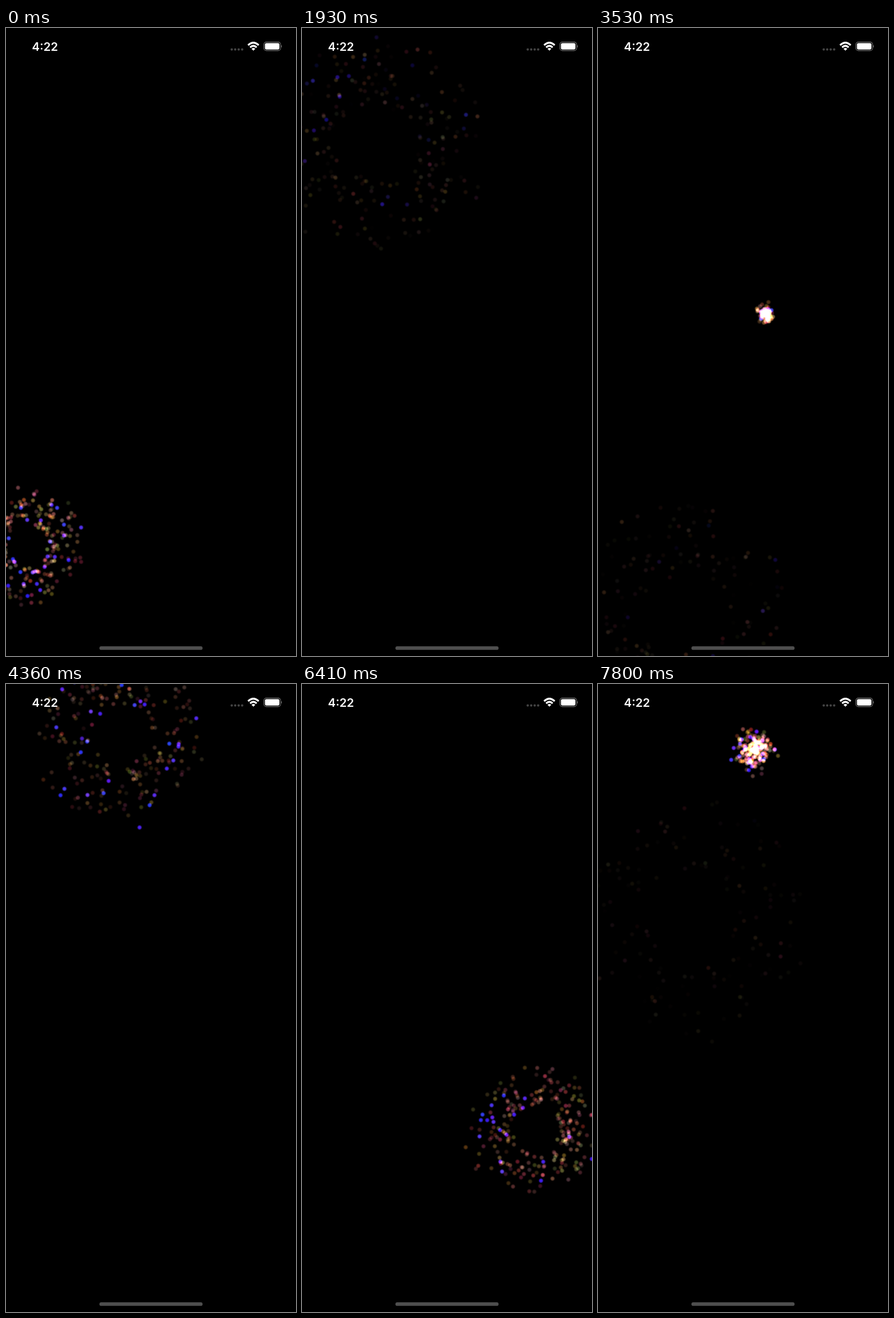
An HTML page with a canvas for the animation above (7.83 s loop, 509 by 1100 pixels).

```html
<!DOCTYPE html>
<html lang="en">
<head>
<meta charset="utf-8">
<title>Fireworks</title>
<style>
  html, body { margin: 0; width: 100%; height: 100%; overflow: hidden; background: #000; }
  canvas, svg { position: absolute; left: 0; top: 0; width: 509px; height: 1100px; }
</style>
</head>
<body>
<canvas id="sky" width="509" height="1100"></canvas>
<svg viewBox="0 0 509 1100" fill="#fff">
  <text x="45.5" y="39.8" font-size="20.5" font-weight="600" font-family="Inter, Roboto, sans-serif">4:22</text>
  <path d="M396.2 37.6h19" stroke="#444" stroke-width="4.2" stroke-linecap="round" stroke-dasharray="0 6.1"/>
  <g fill="none" stroke="#fff" stroke-width="3.2">
    <path d="M424.9 30.2Q434.2 21.4 443.5 30.2"/>
    <path d="M428.5 34Q434.2 28.6 439.9 34"/>
  </g>
  <path d="M430.9 36.4Q434.2 33.6 437.5 36.4L434.2 39.8Z"/>
  <rect x="452.6" y="24.6" width="29.4" height="15" rx="4.4" fill="none" stroke="#777" stroke-width="1.1"/>
  <rect x="454.5" y="26.5" width="25.4" height="11.2" rx="2.7"/>
  <path d="M483.2 29.8Q485.2 32.1 483.2 34.5Z" fill="#888"/>
  <rect x="164" y="1083" width="181" height="6.3" rx="3.15" fill="#4e4e4e"/>
</svg>
<script>
const LOOP = 7830, STEP = 78;
const FIRST = -240, PERIOD = 530;           // one burst every PERIOD ms
const COUNT = 240, EMIT = 90;               // sparks per burst, emission time
const REACH = 340, DRAG = 600, GRAVITY = 0.00075;

// where each burst goes off
const centers = [
  [38, 890], [190, 100], [416, 983], [130, 117], [345, 880], [447, 120],
  [148, 930], [295, 500], [203, 53], [159, 40], [484, 644], [265, 420],
  [410, 760], [300, 400], [161, 288], [275, 115]
];

let seed = 422;
function rand(min = 0, max = 1) {
  seed = (seed * 1664525 + 1013904223) % 4294967296;
  return min + (max - min) * seed / 4294967296;
}

function makeSpark() {
  const blue = rand() < 0.12;
  const rgb = blue
    ? [rand(40, 125), rand(25, 75), 255]
    : [rand(150, 255), rand(55, 190), rand(45, 140)];
  return {
    blue,
    rgb: rgb.map(Math.round),
    angle: rand(0, Math.PI * 2),
    speed: rand(0.4, 1),
    delay: rand(0, EMIT),
    life: blue ? rand(470, 540) : rand(500, 720),
    alpha: blue ? 1 : rand(0.38, 0.88)
  };
}

const bursts = centers.map(([x, y], i) => ({
  x, y, birth: FIRST + i * PERIOD,
  sparks: Array.from({ length: COUNT }, makeSpark)
}));

const ctx = document.getElementById("sky").getContext("2d");

function drawSpark(burst, spark, time) {
  const age = time - burst.birth - spark.delay;
  if (age < 0 || age >= spark.life) return;
  const dist = REACH * spark.speed * (1 - Math.exp(-age / DRAG));
  const x = burst.x + Math.cos(spark.angle) * dist;
  const y = burst.y + Math.sin(spark.angle) * dist + GRAVITY * age * age / 2;
  const fade = spark.blue ? Math.min(1, (spark.life - age) / 130) : 1 - age / spark.life;
  const color = a => `rgba(${spark.rgb},${(a * fade * spark.alpha).toFixed(3)})`;
  const glow = ctx.createRadialGradient(x, y, 0, x, y, 4.6);
  glow.addColorStop(0, color(1));
  glow.addColorStop(0.5, color(0.85));
  glow.addColorStop(1, color(0));
  ctx.fillStyle = glow;
  ctx.fillRect(x - 5, y - 5, 10, 10);
}

function frame(now) {
  const time = Math.floor((now % LOOP + 15) / STEP) * STEP;
  ctx.globalCompositeOperation = "source-over";
  ctx.fillStyle = "#000";
  ctx.fillRect(0, 0, 509, 1100);
  ctx.globalCompositeOperation = "lighter";
  for (const burst of bursts)
    for (const spark of burst.sparks) drawSpark(burst, spark, time);
  requestAnimationFrame(frame);
}
requestAnimationFrame(frame);
</script>
</body>
</html>
```
